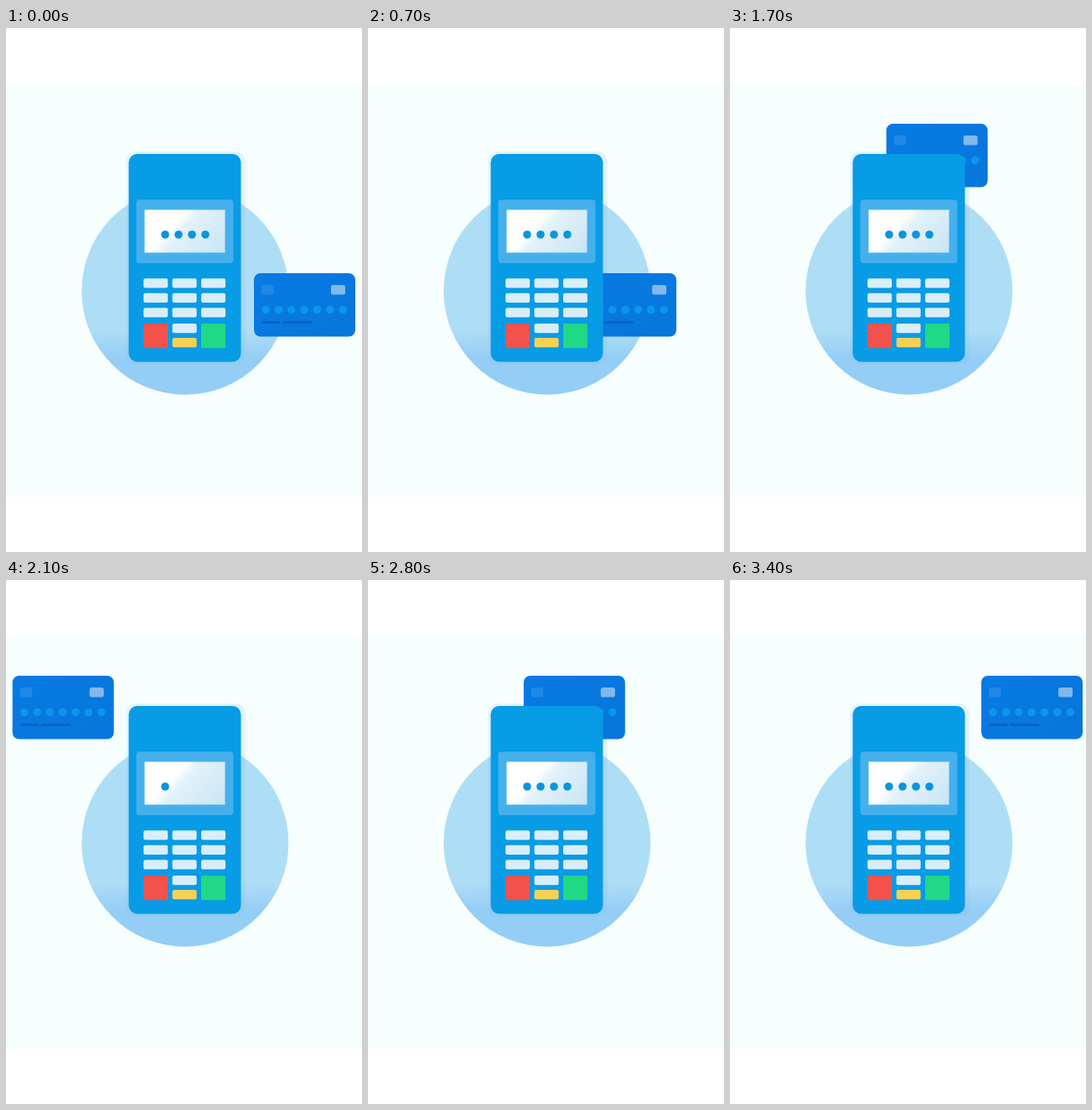
These frames come from a looping animation (425x624 px, 3.5 s). An HTML page:

```html
<!DOCTYPE html>
<html lang="en">
<head>
<meta charset="utf-8">
<title>Card terminal</title>
<style>
html, body { margin: 0; width: 100%; height: 100%; overflow: hidden; background: #fff; }
svg { display: block; }
</style>
</head>
<body>
<svg width="425" height="624" viewBox="0 0 425 624">
  <defs>
    <linearGradient id="disc" gradientUnits="userSpaceOnUse" x1="0" y1="360" x2="0" y2="394">
      <stop stop-color="#aeddf6"/><stop offset="1" stop-color="#94cdf6"/>
    </linearGradient>
    <linearGradient id="glass" gradientUnits="userSpaceOnUse" x1="180" y1="222" x2="248" y2="282.5">
      <stop offset=".26" stop-color="#fff"/>
      <stop offset=".38" stop-color="#e4f2fa"/>
      <stop offset="1" stop-color="#c8e4f5"/>
    </linearGradient>
    <linearGradient id="blue" x1="0" y1="0" x2="1" y2=".6">
      <stop stop-color="#077ae4"/><stop offset="1" stop-color="#0777dc"/>
    </linearGradient>
  </defs>

  <rect y="66" width="425" height="493" fill="#f6fffe"/>
  <circle cx="213.8" cy="313.2" r="123.5" fill="url(#disc)"/>
  <rect x="143.5" y="147" width="142.5" height="254" rx="12" fill="#82b9e8" opacity=".17"/>

  <g id="card">
    <rect width="121" height="75.5" rx="8" fill="url(#blue)"/>
    <rect x="9" y="14" width="14.5" height="11.5" rx="2.5" fill="#1f88e8"/>
    <rect x="92" y="14" width="17" height="11.5" rx="2.5" fill="#80b8ef"/>
    <g id="digits" fill="#0a97ea"></g>
    <path d="M11 58.5H30M35.5 58.5H68" stroke="#0560c0" stroke-width="3" stroke-linecap="round"/>
  </g>

  <rect x="146.5" y="150" width="134" height="247.5" rx="10" fill="#089be6"/>
  <rect x="155.5" y="204.5" width="116" height="75.5" rx="4" fill="#45b0ec"/>
  <rect x="165.5" y="216.5" width="96" height="51" fill="url(#glass)"/>
  <g id="pin" fill="#0a94de"></g>
  <g id="keys"></g>
</svg>
<script>
const byId = id => document.getElementById(id);

function add(parent, tag, attrs) {
  const el = document.createElementNS("http://www.w3.org/2000/svg", tag);
  for (const k in attrs) el.setAttribute(k, attrs[k]);
  return byId(parent).appendChild(el);
}

function dots(parent, count, x, y, step) {
  return Array.from({ length: count }, (_, i) =>
    add(parent, "circle", { cx: x + i * step, cy: y, r: 4.8 }));
}

const key = (col, y, fill = "#d8eefa", height = 11.3) =>
  add("keys", "rect", { x: 164.2 + col * 34.4, y, width: 29, height, rx: 2, fill });

for (let i = 0; i < 9; i++) key(i % 3, 298.2 + Math.floor(i / 3) * 17.5);
key(0, 352, "#f2524b", 29.3);
key(1, 352);
key(1, 369, "#f5d054");
key(2, 352, "#20d885", 29.3);

dots("digits", 7, 14, 43.5, 15.35);
const pin = dots("pin", 4, 190, 246, 16);

// The card slides into the side, then is swiped twice behind the top.
const passes = [
  { until: 1300, start: 490, length: 535, from: 296, to: 150, y: 292 },
  { until: 2000, start: 1300, length: 840, from: 89, to: 300, y: 114 },
  { until: 3500, start: 2000, length: 1395, from: 4, to: 300, y: 114 }
];

const ease = u => (1 - Math.cos(Math.PI * Math.min(1, Math.max(0, u)))) / 2;

function draw(now) {
  const t = Math.floor(now % 3500 / 100) * 100;
  const { start, length, from, to, y } = passes.find(p => t < p.until);
  const x = from + (to - from) * ease((t - start) / length);
  byId("card").setAttribute("transform", `translate(${x} ${y})`);

  const typed = t < 2000 ? 4 : (t - 2000) / 100;
  pin.forEach((dot, i) => dot.setAttribute("opacity", i < typed ? 1 : 0));
}

const begin = performance.now();
function tick() {
  draw(performance.now() - begin);
  requestAnimationFrame(tick);
}
tick();
</script>
</body>
</html>
```
